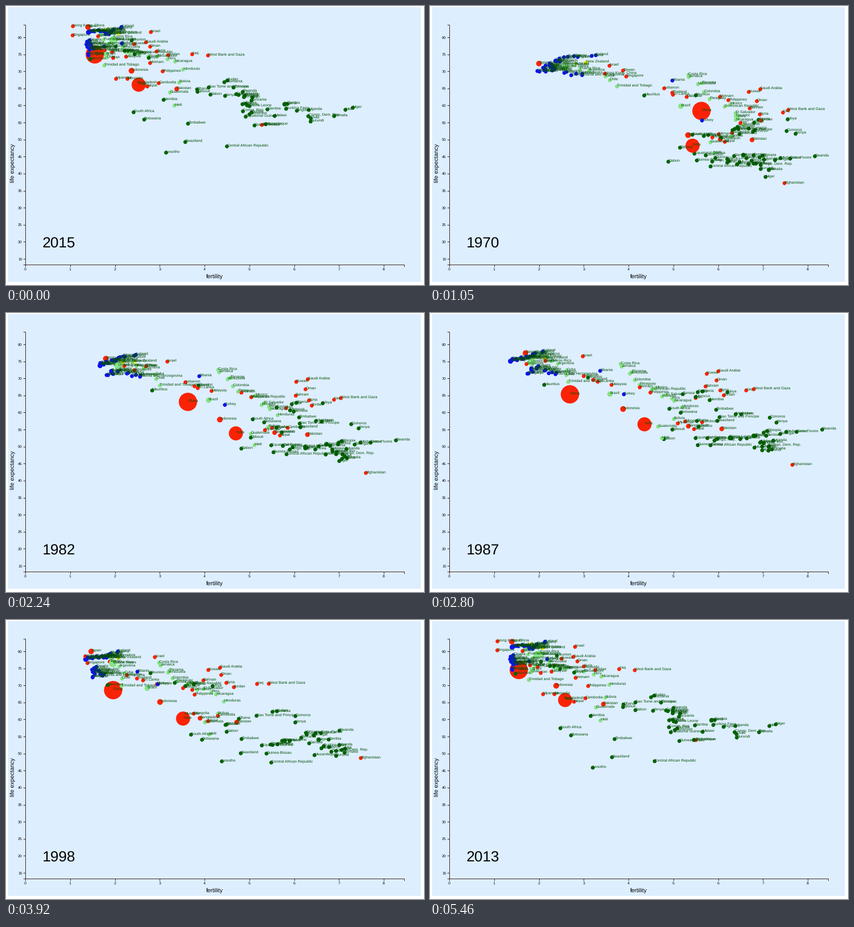
These frames come from a looping animation (800 by 534 pixels, 5740 ms). A matplotlib script:

```python
import numpy as np
import matplotlib.pyplot as plt
from matplotlib.animation import FuncAnimation
from matplotlib.patches import Rectangle

W, H, DPI = 800, 534, 100
PX = 72 / DPI                       # points per pixel
STEP, FRAMES, LAST = 70, 82, 78     # the last pose is held to the end
INK, LABEL = "#351616", "#004d00"
YEARS = (1960, 1970.6, 1987.8, 2005, 2015)

plt.rcParams["font.family"] = "Liberation Sans"
plt.rcParams["text.hinting"] = "none"

# Region: colour, then fertility and life expectancy of 1960 relative to 1970.
AFRICA = "#006400", .1, -4.5
ASIA = "#fb2306", .2, -6.5
EUROPE = "#0b12f2", .2, -2
AMERICA = "#86e386", .5, -4.5
OCEANIA = "#f2f200", .4, -1

RADIUS = {"China": 17.5, "India": 13.5, "United States": 7.5,
          "Indonesia": 5.5, "Japan": 5.3, "Brazil": 5.1, "Germany": 4.8,
          "Bangladesh": 4.5, "Pakistan": 4.5, "Nigeria": 4.4}

# Short collapses of life expectancy: year, depth, half width.
SHOCKS = {"China": (1960, 20, 3), "Cambodia": (1976.5, 20, 4),
          "Rwanda": (1994.6, 34, 1.2), "Haiti": (2010.8, 28, 1.2)}

rng = np.random.default_rng(7)
bubbles = []


def spread(line, count):
    """Place count points evenly along a line of (fertility, life) corners."""
    line = np.array(line, float)
    at = np.linspace(0, len(line) - 1, count)
    return np.array([np.interp(at, range(len(line)), c) for c in line.T]).T


def group(region, names, start, end, pace, swing=(1, 0)):
    """Names move from the start line (1970) to the end line (2015).

    pace is the share of the fertility change done by 1988 and 2005,
    swing the deviation of life expectancy from a steady climb then.
    """
    color, early_f, early_l = region
    names = names.split(" / ")
    count = len(names)
    noise = rng.uniform(-1, 1, (count, 2)) * (count > 1)
    for name, a, b, (nf, nl) in zip(names, spread(start, count),
                                    spread(end, count), noise):
        fert = a[0] + (b[0] - a[0]) * np.array([0, 0, *pace, 1])
        life = np.interp(YEARS, YEARS[1::3], (a[1], b[1]))
        life += (early_l, 0, *swing, 0)
        fert[0] += early_f
        fert *= 1 + .035 * nf
        life += .04 * nl * (86 - life)
        bubbles.append((name, color, fert, life))


group(AFRICA, "Tunisia / Morocco / Egypt / Algeria / Libya",
      [(6.4, 52), (7.4, 56)], [(2, 77), (2.7, 74)], (.28, .94), (3, 2))
group(AFRICA, "South Africa / Botswana / Lesotho / Swaziland / Zimbabwe / Namibia",
      [(5.5, 52), (6.2, 50), (6.5, 54)],
      [(2.45, 58.5), (2.7, 56), (3.14, 46), (3.45, 48.4), (3.6, 53.4), (3.15, 62.3)],
      (.17, .8), (7, -4))
group(AFRICA, "Gabon / Djibouti / Ghana / Sao Tome and Principe / Mauritania / "
      "Sudan / Comoros / Kenya",
      [(4.85, 45), (6.5, 54), (7.8, 53)],
      [(4.1, 64), (3.8, 64), (4.7, 68.5), (4.5, 63.7)], (.13, .74))
group(AFRICA, "Guinea-Bissau / Equatorial Guinea / Cameroon / Guinea / Congo, Rep. / "
      "Sierra Leone / Liberia / Benin / Eritrea / Tanzania / Togo / Ethiopia / "
      "Senegal / Madagascar / Cote d'Ivoire / Rwanda",
      [(5.4, 45), (6.2, 43), (6.7, 44.5), (7.9, 46)],
      [(5, 55), (5, 61), (4.7, 64.5)], (-.05, .57), (2.5, -2))
group(AFRICA, "Mozambique / Malawi / Gambia / Zambia / Burkina Faso / Nigeria / "
      "Angola / Uganda / Congo, Dem. Rep. / Burundi / Chad / Somalia / Mali / Niger",
      [(6.4, 44), (6.8, 44), (7.3, 39.5)],
      [(5.3, 55), (5.7, 60), (6.1, 59), (6.5, 55), (7.56, 59.6)], (-.3, .2), (2, -2.5))
group(AFRICA, "Mauritius / Reunion", [(4.5, 63.6), (5.33, 62.7)],
      [(1.5, 74), (2.3, 79)], (.77, .92))
group(AFRICA, "Central African Republic", [(5.83, 42.1)], [(4.5, 48)], (0, .4), (6, -1))

group(ASIA, "China", [(5.63, 58.4)], [(1.55, 75)], (.72, 1), (.5, -.8))
group(ASIA, "India", [(5.43, 48.2)], [(2.53, 66.1)], (.37, .82), (1.4, .3))
group(ASIA, "Japan", [(2, 72.3)], [(1.4, 83)], (.5, 1.1), (1, .8))
group(ASIA, "Indonesia", [(5.33, 51.3)], [(2.37, 70.2)], (.49, .95), (2.4, 1.5))
group(ASIA, "Afghanistan", [(7.48, 37.2)], [(5.28, 54.3)], (-.08, .04), (.8, .5))
group(ASIA, "Hong Kong, China / Singapore / Taiwan / Israel",
      [(3.6, 69), (4, 69), (3.7, 71.5)],
      [(1.1, 83.2), (1, 79.5), (2.9, 81.5)], (.77, .95))
group(ASIA, "Lebanon / Thailand / Sri Lanka / Malaysia / Vietnam / Philippines",
      [(4.7, 65), (5.2, 63), (6.3, 62)],
      [(1.5, 77), (2.1, 75.5), (3.1, 70.3)], (.55, .9))
group(ASIA, "Iran / Bahrain / Kuwait / Saudi Arabia / Oman / Syria / Jordan / Iraq / "
      "West Bank and Gaza",
      [(6.3, 55), (6.8, 66), (7, 55), (7.7, 58)],
      [(1.9, 74), (2.6, 79), (3, 75), (4.15, 74.4)], (.22, .83), (2, 1.5))
group(ASIA, "Myanmar / Mongolia / Bangladesh / Nepal / Cambodia / Pakistan",
      [(5.8, 50), (6.6, 51)], [(2, 67.5), (3.3, 65.5)], (.2, .83), (-.5, 0))

group(EUROPE, "Germany / Italy / Spain / Greece / Austria / Portugal / Switzerland / "
      "Luxembourg / Malta / Netherlands / Belgium / Finland / Denmark / "
      "United Kingdom / Sweden / Norway / France / Ireland / Iceland",
      [(2.3, 71), (2.2, 72), (2.5, 74), (3.2, 74.6)],
      [(1.4, 81.5), (1.6, 82), (1.9, 81), (2.1, 83)], (1.05, 1.08), (0, 0))
group(EUROPE, "Hungary / Romania / Bulgaria / Poland / Slovak Republic / "
      "Czech Republic / Slovenia / Croatia / Serbia / Latvia / Lithuania / Estonia / "
      "Macedonia / Montenegro / Bosnia and Herzegovina",
      [(1.95, 70.5), (2.3, 70.5), (3, 68.6)],
      [(1.4, 75), (1.4, 79), (1.5, 76)], (.4, 1.08), (-.5, -.8))
group(EUROPE, "Turkey / Albania", [(5.5, 54.6), (5.1, 68)],
      [(2.1, 78), (1.8, 77.6)], (.5, .92))

group(AMERICA, "United States", [(2.59, 71.3)], [(1.96, 79.2)], (1.2, .9), (.5, 0))
group(AMERICA, "Brazil", [(5.17, 59.8)], [(1.8, 75)], (.47, .87), (-.3, -.3))
group(AMERICA, "Canada / Uruguay / Puerto Rico / Argentina / Cuba / Chile / "
      "Trinidad and Tobago", [(2.6, 72.5), (3.2, 70), (3.82, 66)],
      [(1.6, 82), (1.9, 78), (1.8, 72)], (.55, .95))
group(AMERICA, "Costa Rica / Jamaica / Panama / Venezuela / Colombia / Paraguay / "
      "Mexico / Dominican Republic / Ecuador / El Salvador / Peru / Nicaragua / "
      "Honduras / Bolivia / Guatemala / Haiti",
      [(5.4, 69), (5.8, 65), (6.3, 58), (6.6, 55), (5.8, 47)],
      [(2, 80), (2.3, 76), (2.6, 75), (3.5, 72.5), (3.27, 60.6)], (.45, .84), (1, .5))

group(OCEANIA, "Australia / New Zealand", [(2.85, 72), (3, 72.2)],
      [(1.85, 82.3), (2.05, 81)], (.95, 1.05), (0, 0))

bubbles.sort(key=lambda b: b[0])
names, colors, ferts, lives = zip(*bubbles)


def stage_x(fert):
    return 37 + 85.75 * fert


def stage_y(life):
    return 60 + 6.523 * (80 - life)


def year_at(frame):
    """The clock opens on the final year, then restarts in 1960."""
    return YEARS[-1] if frame == 0 else 1960.3 + .688 * min(frame, LAST)


def positions(year):
    spots = []
    for name, fert, life in zip(names, ferts, lives):
        f, l = (np.interp(year, YEARS, v) for v in (fert, life))
        if name in SHOCKS:
            when, depth, width = SHOCKS[name]
            l -= depth * max(0, 1 - abs(year - when) / width)
        spots.append((stage_x(min(f, 8.4)), stage_y(np.clip(l, 13.2, 83.5))))
    return np.array(spots)


fig = plt.figure(figsize=(W / DPI, H / DPI), dpi=DPI, facecolor="white")
ax = fig.add_axes([0, 0, 1, 1])
ax.set_xlim(0, W)
ax.set_ylim(H, 0)
ax.axis("off")


def write(x, y, s, size, color="black", **kw):
    return ax.text(x, y, s, fontsize=size * PX, color=color, **kw)


def line(xs, ys):
    ax.plot(xs, ys, color=INK, lw=PX, zorder=1, solid_capstyle="butt")


ax.add_patch(Rectangle((4, 2), 790, 526, color="#ddeeff", lw=0, zorder=0))
LEFT, BASE = 36.5, 494.5
line([LEFT - 4, LEFT, LEFT, LEFT - 4], [35.5, 35.5, BASE, BASE])
line([LEFT, LEFT, 761.5, 761.5], [BASE + 4, BASE, BASE, BASE + 4])
for n in range(9):
    x = stage_x(n)
    line([x, x], [BASE, BASE + 4])
    write(x, 505.5, str(n), 7.2, ha="center")
for n in range(15, 81, 5):
    y = stage_y(n)
    line([LEFT - 4, LEFT], [y, y])
    write(31, y + 2.5, str(n), 7.2, ha="right")
write(399, 522, "fertility", 11.2, ha="center")
write(14, 301, "life expectancy", 11.2, ha="center", va="center", rotation=90)
clock = write(70, 462, "", 28.4)

start = positions(YEARS[-1])
sizes = [(2 * RADIUS.get(n, 3.7) * PX) ** 2 for n in names]
dots = ax.scatter(*start.T, s=sizes, c=colors, linewidths=0, zorder=2)
labels = [write(x, y, n, 7.4, LABEL, zorder=3) for n, (x, y) in zip(names, start)]


def draw(frame):
    year = year_at(frame)
    spots = positions(year)
    dots.set_offsets(spots)
    for label, spot in zip(labels, spots):
        label.set_position(spot)
    clock.set_text(str(int(year)))
    return [dots, clock, *labels]


anim = FuncAnimation(fig, draw, frames=FRAMES, interval=STEP, repeat=True,
                     repeat_delay=0, blit=False)
plt.show()
```
